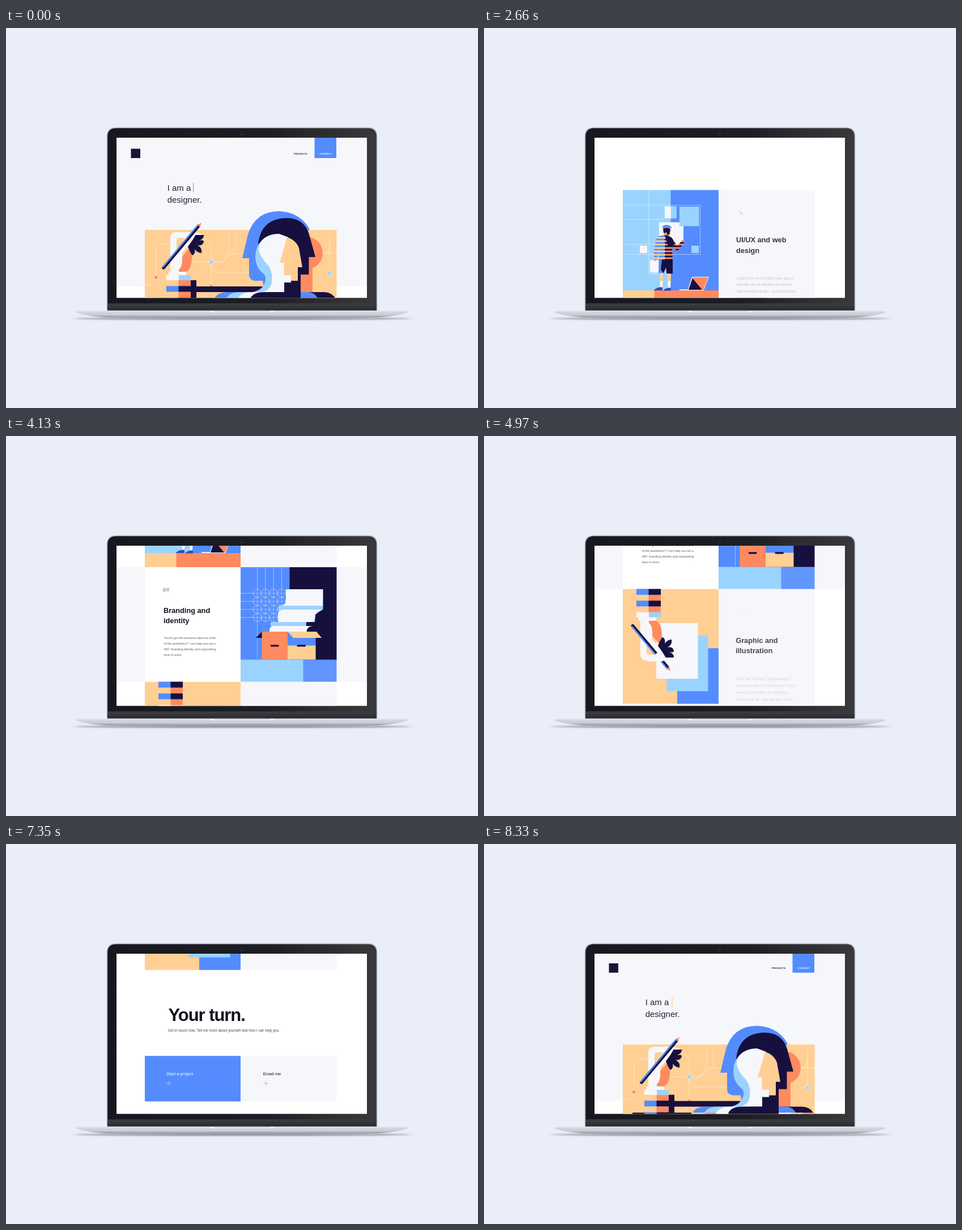
An HTML page for the animation above (8400 ms loop, 833x672 px).

```html
<!DOCTYPE html>
<html lang="en">
<head>
<meta charset="utf-8">
<title>Portfolio scroll</title>
<style>
html, body { margin: 0; width: 100%; height: 100%; overflow: hidden; background: #eaeef8; }
svg { display: block; font-family: "Liberation Sans", Arial, sans-serif; fill: #14121f; }
.blue { fill: #548cff } .sky { fill: #9bd3ff } .navy { fill: #17103f } .coral { fill: #ff8a60 }
.peach { fill: #ffcf94 } .pale { fill: #f6f7fb } .white { fill: #fff }
.wire { fill: none; stroke: #fff; stroke-width: .6; opacity: .75 }
.cap { font-weight: bold; font-size: 4px; letter-spacing: .35px }
.lead { font-size: 15px; fill: #23213a }
.big { font-weight: bold; font-size: 31px; letter-spacing: -1.05px }
.title { font-weight: bold; font-size: 12.75px }
.body { font-size: 5.45px; fill: #5f5f6a }
.num { font-size: 9.5px; letter-spacing: .6px; font-weight: bold; fill: none; stroke: #8b8b96; stroke-width: .6; stroke-dasharray: 40 }
.note { font-size: 6.33px; fill: #4a4a52 }
.link { font-size: 7.6px }
.arrow { fill: none; stroke-width: .9 }
</style>
</head>
<body>
<svg width="833" height="672" viewBox="0 0 833 672">
<defs>
  <linearGradient id="bezel"><stop offset="0" stop-color="#171720"/><stop offset=".6" stop-color="#1d1d25"/><stop offset=".8" stop-color="#2d2d31"/><stop offset="1" stop-color="#39393c"/></linearGradient>
  <linearGradient id="hinge" x2="0" y2="1"><stop offset="0" stop-color="#3d3d43"/><stop offset="1" stop-color="#292a31"/></linearGradient>
  <linearGradient id="base" x2="0" y2="1"><stop offset="0" stop-color="#dadbe3"/><stop offset=".65" stop-color="#c9cad3"/><stop offset=".88" stop-color="#a9aab4"/><stop offset="1" stop-color="#7c7d88"/></linearGradient>
  <filter id="blur" x="-10%" y="-150%" width="120%" height="400%"><feGaussianBlur stdDeviation="7 1.4"/></filter>
  <clipPath id="screen"><rect x="195" y="194" width="442" height="283.3"/></clipPath>
  <clipPath id="shirt"><path d="M307 369L321 366 331 371 341 386 350 376 354 379 342 395 332 388 333 411H308L309 390 305 410 300 409Q300 378 307 369Z"/></clipPath>
  <g id="hand">
    <g id="sleeve"></g>
    <path class="pale" d="M283 446V437H287V431H290V372Q290 361 301 361H329Q340 361 349 367H337L327 371 307 397 312 401V431H318V437H305V446Z"/>
    <path class="peach" d="M301 376Q301 371 306 371H318L301 393Z"/>
    <path class="coral" d="M305 427Q312 422 311 404L325 388Q329 396 328 408 327 421 323 427L318 431H305Z"/>
    <path class="sky" d="M305 437.500H326V446H305Z"/>
    <path class="navy" d="M321 386Q323 372 333 366H349Q350 372 341 376 349 374 349 378 347 386 338 384 347 389 345 398 337 397 333 391 335 399 329 402 324 396 321 386Z"/>
    <path class="pale" d="M318 367L335 365Q329 377 318 390L304 405 300 399Z"/>
  </g>
  <g id="pencil">
    <path d="M278 424L340 350" stroke="#17103f" stroke-width="5.6" stroke-linecap="round"/>
    <path d="M277 422.500L338.500 348.500" stroke="#548cff" stroke-width="2.600" stroke-linecap="round"/>
    <path class="coral" d="M338 348L345 344 342 352Z"/>
  </g>
</defs>

<ellipse cx="417" cy="513.800" rx="298" ry="2" fill="#7d8092" filter="url(#blur)"/>
<path d="M178.500 500V192Q178.500 176.500 194 176.500H639Q654.500 176.500 654.500 192V500Z" fill="url(#bezel)" stroke="#b0b0bd" stroke-width="1.500"/>
<rect x="179.500" y="487" width="474" height="13" fill="url(#hinge)"/>
<circle cx="416.500" cy="188.200" r="1.300" fill="#41434f"/>
<path d="M124 500H709V503Q690 510 655 511.500H178Q143 510 124 503Z" fill="url(#base)"/>
<rect x="124" y="499.600" width="585" height="1.600" fill="#e6e7ee"/>
<path d="M361 500H473V501Q472 504 467 504H367Q362 504 361 501Z" fill="#d9dae3"/>
<path d="M361 500H367V503.500Q361 503 361 500ZM473 500H467V503.500Q473 503 473 500Z" fill="#f2f3f8"/>

<g clip-path="url(#screen)">
<rect class="white" x="195" y="194" width="442" height="284"/>
<g id="page">
  <g id="hero">
    <rect class="pale" x="195" y="194" width="442" height="262.500"/>
    <rect x="220.500" y="213.500" width="16.500" height="16.500" fill="#1a1733"/>
    <text class="cap" x="508" y="223.500">PROJECTS</text>
    <rect class="blue" x="544.500" y="194" width="38.500" height="36"/>
    <text class="cap white" x="553.500" y="223.500">CONTACT</text>
    <text class="lead" x="284.700" y="287.800">I am a</text>
    <text class="lead" x="284.700" y="308.500">designer.</text>
    <rect id="cursor"/>
    <rect class="peach" x="245" y="357" width="338.500" height="141"/>
    <path class="wire" d="M245 455Q264.500 455 264.500 441V398Q264.500 382 281 382H290M307 371H340Q362 371 362 392V457Q362 475 346 475M330 414H376Q384 414 388 407T404 399H430M393 357V384Q393 414 376 414M405 357V390Q405 399 396 399M362 418Q362 432 376 432H430M571 357V434M558 398H583M558 398Q571 398 571 384"/>
    <g stroke="#fff" stroke-width=".7">
      <circle class="coral" cx="264.500" cy="441" r="3.500"/><circle class="sky" cx="362.200" cy="414" r="3.800"/>
      <circle class="coral" cx="362.200" cy="457" r="3.500"/><circle class="sky" cx="571" cy="434" r="3.800"/>
    </g>
    <use href="#hand"/><use href="#pencil"/>
    <path class="navy" d="M326 446H336V457H455V467H336V477.500H326Z"/>
    <circle class="coral" cx="530" cy="398" r="29"/>
    <path class="coral" d="M520 425H541V469H520Z"/>
    <path class="blue" d="M417 407L427 365Q440 324 482 324 520 326 536 356L500 390 470 420V460H455L453 447H439Q429 446 429 436V407Z"/>
    <path class="navy" d="M445 382Q450 337 495 336 526 336 535 365L546 405H534.500V436H520V467H562Q576 468 581 478H435Q440 467 460 463L491 450V420Z"/>
    <path class="sky" d="M480 364A39 39 0 0 0 440 402Q440 424 454 434 459 438 458 446 455 463 435 467H470Z"/>
    <path class="pale" d="M482 364Q450 366 446 388 445 400 460 417 471 427 469 449 467 465 449 467H491V450H503V437L498 370Z"/>
    <path class="peach" d="M496 370L483 415H490.500V437H503V447H515V423H523L517 389Q512 375 496 370Z"/>
    <path class="blue" d="M368 477.500Q374 467 392 467H450V477.500ZM520 467H534Q545 468 550 477.500H520Z"/>
    <path class="sky" d="M389 477.500Q395 467 413 467H450V477.500Z"/>
    <path class="pale" d="M410 477.500Q416 467 434 467H456V477.500Z"/>
    <path class="navy" d="M431 478Q437 467 455 467H520V478Z"/>
    <g id="blocks"></g>
  </g>

  <g transform="translate(0 289)">
    <circle class="coral" cx="288" cy="288" r="1.900"/>
    <text class="cap" x="292.500" y="289.400" style="font-size:3.8px;letter-spacing:.5px">INTRODUCTION</text>
    <g id="intro"><text class="big" x="285.500" y="388">Design anything.</text></g>
    <g id="summary">
      <text class="note" x="286" y="480.800">From first sketch to final pixel, I help ideas take shape and find</text>
      <text class="note" x="286" y="491.300">a look of their own.</text>
    </g>
  </g>

  <g transform="translate(0 624)">
    <path class="sky" d="M245 287H330V465H245Z"/><path class="blue" d="M329.500 287H414V465H329.500Z"/>
    <path class="peach" d="M245 464.500H301V489.700H245Z"/><path class="coral" d="M300.500 464.500H414V489.700H300.500Z"/>
    <path class="pale" d="M414 287H583.500V489.700H414Z"/>
    <path class="wire" d="M245 314H381.500V401H245M245 339H319M245 383H309M291 287V435H308"/>
    <path class="pale" d="M319 316H339.500V337H319ZM275 385.500H288V398.500H275ZM309 344H352V384H309ZM293 411H311V433H293Z"/>
    <path class="sky" d="M330 316H339.500V337H330ZM345 316.500H379.500V351H345ZM366 385.500H379V398.500H366Z"/>
    <path class="coral" d="M316 354H327L329 361 327 368H318Z"/>
    <path class="navy" d="M316 355Q323 352 329 356L327 366H323V362L317 363Z"/>
    <path class="blue" d="M314 354Q316 348 324 349 331 350 331 355L322 353Z"/>
    <g clip-path="url(#shirt)" id="stripes"></g>
    <circle class="coral" cx="351" cy="377" r="2.300"/><circle class="coral" cx="302.500" cy="410.500" r="2"/>
    <path class="blue" d="M308.500 410H322L317 434H308Z"/><path class="navy" d="M314 410H333V435H322.500L321 424 317 434 312 428Z"/>
    <path class="peach" d="M309.500 434H316L315 459H311ZM323 435H330L328.500 460H325Z"/>
    <path class="pale" d="M310.500 448H315.500L315 459H311ZM324 448H329.500L328.500 460H325Z"/>
    <path d="M299.500 464.500Q303 460 310 459H315V464.500ZM316 465Q319 461 325 460H330V465Z" fill="#2b4fb8"/>
    <path class="white" d="M345 462.800H360L367 440.500H397L387.500 464.500H345Z"/>
    <path class="coral" d="M368 441.500H396L387 463.500H361Z"/><path class="navy" d="M368 443L361 463.500H385Z"/>
  </g>

  <g transform="translate(0 881.7)">
    <path class="pale" d="M195 232H245V434.700H195ZM583.500 232H637V434.700H583.500Z"/>
    <path class="blue" d="M414 232H501V396H414Z"/><path class="navy" d="M500.500 232H583.500V396H500.500Z"/>
    <path class="sky" d="M414 395.500H525V434.700H414Z"/><path d="M524.500 395.500H583.500V434.700H524.500Z" fill="#6196ff"/>
    <g id="rings"></g>
    <path class="sky" d="M494 293V300H481V314H531V329H467V336H530V329H545L546 316 559.500 306V299Z"/>
    <path class="pale" d="M494 271H559.500V300H485Q494 299 494 290ZM480 329Q481 326 480 318 479 308 489 307H559Q558 308 553 309 546 311 545.500 318 545 329 538 329ZM465 346V342Q466 336 472 336H541Q531 337 530.500 346Z"/>
    <path class="coral" d="M451.500 346H497V395.500H451.500Z"/><path class="blue" d="M497 347H546.500V371H497Z"/>
    <path class="peach" d="M497 370.500H546.500V395.500H497ZM497 346H548L557 357H507Z"/>
    <path class="navy" d="M451.500 346L441 357H451.500Z"/>
    <path d="M468.300 370.800H480M515 370.800H527.500" stroke="#17103f" stroke-width="3.200" stroke-linecap="round"/>
  </g>

  <g transform="translate(0 1090.4)">
    <path class="peach" d="M245 226H414V428.700H245Z"/><path class="blue" d="M341 330.500H414V428.700H341Z"/>
    <path class="sky" d="M322.500 308H395.500V406.500H322.500Z"/><path class="pale" d="M304 286H377.500V384.500H304ZM414 226H583.500V428.700H414Z"/>
    <use href="#hand" transform="matrix(1 0 0 -1 -14 713)"/>
    <use href="#pencil" transform="matrix(1 0 0 -1 -15.5 715)"/>
    <path class="pale" d="M298 345L309 336 320 349Q318 354 312 354H287Z"/>
  </g>

  <g id="copy"></g>

  <g transform="translate(0 1297)">
    <g id="turn">
      <text class="big" x="286.500" y="312">Your turn.</text>
      <text class="note" x="286" y="331">Get in touch now. Tell me more about yourself and how I can help you.</text>
    </g>
    <g id="links">
      <path class="blue" d="M245 374H414V454.500H245Z"/><path class="pale" d="M414 374H583.500V454.500H414Z"/>
      <text class="link white" x="283" y="408.500">Start a project</text><text class="link" x="453.700" y="408.500">Email me</text>
      <path class="arrow" stroke="#ffcf94" d="M283 422.500H290M286.500 419L290 422.500 286.500 426"/>
      <path class="arrow" stroke="#ff8a60" d="M454 422.500H461M457.500 419L461 422.500 457.500 426"/>
    </g>
  </g>
</g>
</g>
</svg>
<script>
const $ = id => document.getElementById(id);
const rect = (cls, x, y, w, h) => `<rect class="${cls}" x="${x}" y="${y}" width="${w}" height="${h}"/>`;
const range = n => [...Array(n).keys()];
const clamp = v => Math.min(1, Math.max(0, v));

$('sleeve').innerHTML = range(4).map(i => {
  const y = 446 + i * 10.3;
  return rect(i % 2 ? 'blue' : 'peach', 283, y, 22, 10.4) + rect(i % 2 ? 'navy' : 'coral', 304.5, y, 21.5, 10.4);
}).join('');

// Each entry: colour and left edge; the block runs to the next edge.
const row = (y, h, list) => list.map(([cls, x], i) =>
  rect(cls, x, y, (list[i + 1] ? list[i + 1][1] : 583.5) - x, h)).join('');
const middle = [['coral', 390.5], ['pale', 409.5], ['navy', 431.5], ['pale', 520]];
$('blocks').innerHTML =
  row(477.5, 11, [['peach', 245], ['navy', 262], ['blue', 283], ['navy', 305], ['peach', 366], ...middle, ['peach', 542], ['coral', 562.5]]) +
  row(488.5, 9.5, [['navy', 245], ['peach', 283], ['coral', 305], ['navy', 326], ['blue', 366], ['navy', 388], ...middle, ['blue', 542], ['navy', 562.5]]);

$('stripes').innerHTML = rect('peach', 298, 364, 58, 48) + rect('coral', 320, 364, 36, 48) +
  range(8).map(i => rect('blue', 298, 367 + i * 6, 22, 3) + rect('navy', 319, 367 + i * 6, 37, 3)).join('') +
  '<path class="navy" d="M320 368L333 371 336 384 325 388Z"/>';

const steps = range(4).map(i => 443.5 + i * 14.3);
$('rings').innerHTML = steps.map((x, i) => {
  const y = x - 165.5;
  return `<path class="wire" d="M${x} 232V${i ? 329 : 395}M414 ${y}H494"/>` +
    steps.map(cx => `<circle cx="${cx}" cy="${y}" r="7.2" fill="none" stroke="#ffdcb4" stroke-width=".6"/>`).join('');
}).join('');

// Panel copy: left edge, panel top, scroll start, heading, paragraph.
const panels = [
  [449, 911, 2254, ['UI/UX and web', 'design'],
    ['Leave it to me to realize your app or', 'website into an intuitive, functional,', 'and beautiful design - one that under-', 'stands your users.']],
  [278, 1113.7, 3350, ['Branding and', 'identity'],
    ["You've got the business idea but none", 'of the aesthetics? I can help you set a', '360° branding identity and copywriting', 'tone of voice.']],
  [449, 1316.4, 4600, ['Graphic and', 'illustration'],
    ['Print ad? Posters? Digital assets?', "Children's book? Food menu? If you", 'need an illustration for anything -', 'anything at all - you call me, okay?']]
];
const lines = (cls, list, gap) => list.map((s, i) => `<text class="${cls}" y="${i * gap}">${s}</text>`).join('');
$('copy').innerHTML = panels.map(([x, y, , head, text], i) =>
  `<text class="num" id="num${i}" x="${x - 1}" y="${y + 42.7}">0${i + 1}</text>` +
  `<g id="head${i}">${lines('title', head, 18.5)}</g><g id="text${i}">${lines('body', text, 10)}</g>`).join('');

// Quick start, long soft tail.
const ease = p => {
  p = clamp(p);
  const a = p ** 2.95;
  return a / (a + .025 * (1 - p));
};
// Scroll moves: start, duration, resting offset.
const moves = [[980, 950, 303], [2254, 950, 680.5], [3350, 950, 883.2], [4600, 950, 1085.3], [5880, 900, 1312.5], [7280, 1120, 0]];
const scroll = t => {
  let y = 0, from = 0;
  for (const [start, span, to] of moves) {
    y += (to - from) * ease((t - start) / span);
    from = to;
  }
  return y;
};
const place = (id, x, y, scale, opacity) => {
  $(id).setAttribute('transform', `translate(${x} ${y}) scale(${scale})`);
  $(id).setAttribute('opacity', opacity);
};
const fade = (id, t, start, span) => $(id).setAttribute('opacity', clamp((t - start) / span));

function draw(t) {
  $('page').setAttribute('transform', `translate(0 ${-scroll(t)})`);
  const warm = t > 7300;
  const attrs = warm ? { x: 331.4, y: 273.7, width: 1.3, height: 19, fill: '#ffcf94' }
    : { x: 330.3, y: 274, width: .8, height: 16.5, fill: '#77778a' };
  attrs.opacity = warm || t % 700 < 350 ? 1 : 0;
  for (const k in attrs) $('cursor').setAttribute(k, attrs[k]);

  fade('intro', t, 1350, 300);
  fade('summary', t, 1490, 350);
  panels.forEach(([x, y, start], i) => {
    const a = 1 - clamp((t - start - 110) / 500), b = 1 - clamp((t - start - 260) / 500);
    place('head' + i, x - 10 * a, y + 80.7 + 30 * a, 1, 1 - a * a);
    place('text' + i, x + .5 - 5 * b, y + 127 + 44 * b, 1 + .24 * b, 1 - b);
    const p = clamp((t - start - 360) / 700);
    $('num' + i).style.strokeDashoffset = 40 * (1 - p);
    $('num' + i).setAttribute('opacity', p > 0 ? 1 : 0);
  });
  fade('turn', t, 6420, 400);
  fade('links', t, 6520, 400);
}
function frame() {
  draw(performance.now() % 8400);
  requestAnimationFrame(frame);
}
frame();
</script>
</body>
</html>
```
